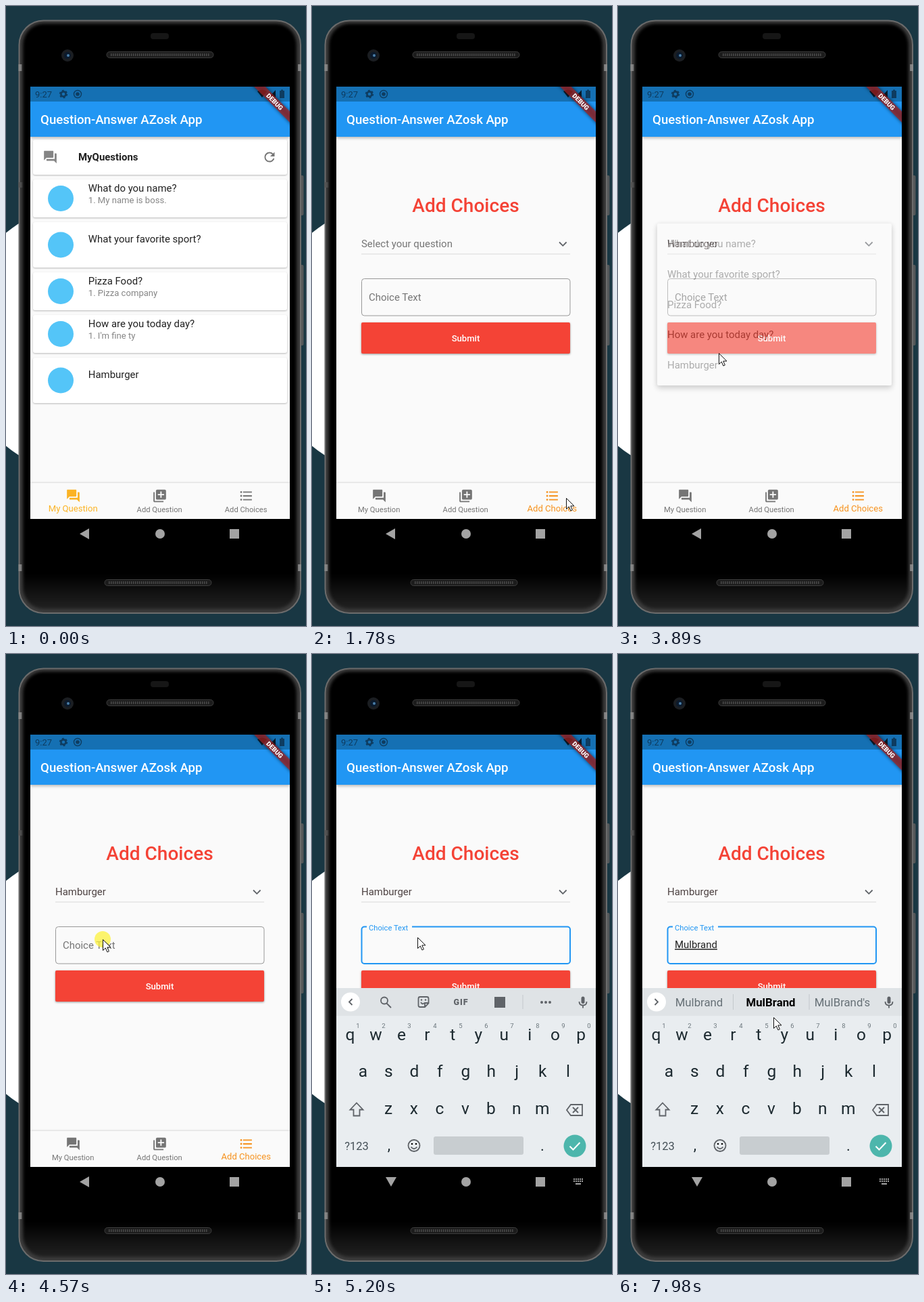
Recreate the animation shown at these times as an HTML page. Size 444 px wide and 915 px high, loop 8000 ms.

```html
<!DOCTYPE html>
<html lang="en">
<head>
<meta charset="utf-8">
<title>Question app demo</title>
<style>
  html, body { margin: 0; width: 100%; height: 100%; overflow: hidden; background: #193743; }
  svg { display: block; font-family: Roboto, sans-serif; }
  .line { fill: none; stroke: #5f6368; stroke-width: 1.8; }
  .card { fill: #fff; filter: drop-shadow(0 1px 1px #0004); }
  .bold { font-weight: 700; }
  .medium { font-weight: 500; }
  .mid { text-anchor: middle; }
</style>
</head>
<body>
<svg id="stage" width="444" height="915" viewBox="0 0 444 915"></svg>
<script>
const LOOP = 8000;
const BRAND = 'Mulbrand', BRAND_CAPS = 'MulBrand';
const QUESTIONS = ['What do you name?', 'What your favorite sport?', 'Pizza Food?', 'How are you today day?', 'Hamburger'];
const ANSWERS = ['1. My name is boss.', '', '1. Pizza company', "1. I'm fine ty", ''];
const GREY = [117, 117, 117], AMBER = [251, 179, 36], ORANGE = [246, 146, 30];

const FORUM = 'M21 6h-2v9H6v2c0 .55.45 1 1 1h11l4 4V7c0-.55-.45-1-1-1zm-4 6V3c0-.55-.45-1-1-1H3c-.55 0-1 .45-1 1v14l4-4h10c.55 0 1-.45 1-1z';
const ADD = 'M4 6H2v14c0 1.1.9 2 2 2h14v-2H4V6zm16-4H8c-1.1 0-2 .9-2 2v12c0 1.1.9 2 2 2h12c1.1 0 2-.9 2-2V4c0-1.1-.9-2-2-2zm-1 9h-4v4h-2v-4H9V9h4V5h2v4h4v2z';
const LIST = 'M7 5h14v2H7zM7 11h14v2H7zM7 17h14v2H7z' + [6, 12, 18].map(y => `M2.5 ${y}a1.5 1.5 0 1 0 3 0a1.5 1.5 0 1 0-3 0z`).join('');
const REFRESH = 'M17.65 6.35C16.2 4.9 14.21 4 12 4c-4.42 0-7.99 3.58-7.99 8s3.57 8 7.99 8c3.73 0 6.84-2.55 7.73-6h-2.08c-.82 2.33-3.04 4-5.65 4-3.31 0-6-2.69-6-6s2.69-6 6-6c1.66 0 3.14.69 4.22 1.78L13 11h7V4l-2.35 2.35z';

// Markup helpers
const text = (x, y, size, str, attrs = '') => `<text x="${x}" y="${y}" font-size="${size}" ${attrs}>${str}</text>`;
const rect = (x, y, w, h, attrs = '') => `<rect x="${x}" y="${y}" width="${w}" height="${h}" ${attrs}/>`;
const circle = (x, y, r, attrs = '') => `<circle cx="${x}" cy="${y}" r="${r}" ${attrs}/>`;
const path = (d, attrs = 'class="line"') => `<path d="${d}" ${attrs}/>`;
const icon = (d, x, y, attrs = '') => path(d, `transform="translate(${x - 11.2} ${y - 11.2}) scale(.934)" ${attrs}`);

function phone() {
  const speaker = (x, y) => rect(x, y, 158, 9, 'rx="4.5" fill="#1c1c1c" stroke="#3d3d3d"') +
    path(`M${x + 6} ${y + 4.5}h146`, 'stroke="#4a4a4a" stroke-width="4" stroke-dasharray="1.5 1.5"');
  return circle(130, 492, 204, 'fill="#fff"') +
    rect(434, 250, 6.5, 59, 'rx="2" fill="#55585a"') + rect(434, 382, 6.5, 119, 'rx="2" fill="#55585a"') +
    rect(19.5, 21.5, 416.5, 874.5, 'rx="36" fill="#3c3c3c" stroke="#6c6c6c" stroke-width="2"') +
    [86, 824].map(y => rect(18.5, y, 5, 10, 'fill="#888"') + rect(432, y, 5, 10, 'fill="#888"')).join('') +
    rect(18.5, 260, 6, 8, 'fill="#555"') +
    rect(25, 26, 405, 864, 'rx="31" fill="url(#face)" style="filter:blur(2px)"') +
    rect(214, 40, 27, 9, 'rx="4" fill="#161616"') +
    circle(91, 73, 9, 'fill="#1b1e22"') + circle(91, 73, 5, 'fill="#0b1a2c"') + circle(92, 73, 2, 'fill="#4a7ea8"') +
    speaker(149, 67.5) + speaker(146, 846.5);
}

function questionsPage() {
  const tops = [256, 319, 393, 456, 519];
  return rect(40, 197, 376, 52, 'rx="3" class="card"') + icon(FORUM, 65.5, 223, 'fill="#858585"') +
    text(107, 228, 14.95, 'MyQuestions', 'class="bold" fill="#212121"') + icon(REFRESH, 390, 223, 'fill="#757575"') +
    QUESTIONS.map((q, i) => {
      const y = tops[i], answer = ANSWERS[i], h = answer ? 56 : 67;
      return rect(40, y, 376, h, 'rx="3" class="card"') + circle(81, y + h / 2, 19, 'fill="#54c5f8"') +
        text(121.8, y + (answer ? 18 : 30), 14.95, q, 'fill="#212121"') + text(121.8, y + 34.5, 13.08, answer, 'fill="#858585"');
    }).join('');
}

function choicesPage() {
  return text(227.5, 303.5, 28, 'Add Choices', 'class="medium mid" fill="#f44336"') +
    text(73, 356, 14.95, '', 'id="selected"') +
    path('M366 348.5l5.3 5.3 5.3-5.3') + path('M73 366h309', 'stroke="#d8d8d8"') +
    rect(73.5, 402.5, 308.5, 54.5, 'id="field" rx="4" fill="none"') +
    rect(81, 400, 67, 5, 'id="gap" fill="#fafafa"') + text(84, 435, 14.95, 'Choice Text', 'id="label"') +
    text(84, 434, 14.95, '', 'id="typed" fill="#212121" text-decoration="underline"') +
    rect(0, 420, 1.8, 18, 'id="caret" fill="#2196f3"') +
    rect(73, 467, 309, 46, 'rx="2" fill="#f44336" style="filter:drop-shadow(0 1px 1.5px #0006)"') +
    text(227.5, 495, 13.1, 'Submit', 'class="medium mid" fill="#fff"');
}

function appChrome() {
  const ink = 'fill="#0e3c60"';
  return rect(36, 119, 384, 74, 'fill="#2196f3" style="filter:drop-shadow(0 2px 2px #0004)"') +
    rect(36, 119, 384, 22, 'fill="#1570b3"') +
    text(43, 134.7, 13, '9:27', ink) +
    circle(85, 130, 3.6, 'fill="none" stroke="#0e3c60" stroke-width="2.6"') +
    circle(85, 130, 5.4, 'fill="none" stroke="#0e3c60" stroke-width="1.6" stroke-dasharray="2.83"') +
    circle(106, 130, 5.5, 'fill="none" stroke="#0e3c60" stroke-width="1.4"') + circle(106, 130, 2.8, ink) +
    path('M372 126q7-5 14 0l-7 9zM399 124v11h-10z', 'fill="#0a1c2c"') + path('M405 125h2v-1.5h3v1.5h2v11h-7z', ink) +
    text(51, 174, 18.7, 'Question-Answer AZosk App', 'class="medium" fill="#fff"') +
    '<g transform="translate(397.7 141.3) rotate(45)">' +
    rect(-60, -6, 120, 12, 'opacity=".55" style="filter:blur(2.5px)"') +
    rect(-60, -5.8, 120, 11.6, 'fill="#a82222" opacity=".7"') +
    text(0, 3.4, 9.5, 'DEBUG', 'class="mid" font-weight="900" fill="#fff"') + '</g>';
}

function tabBar() {
  const tabs = [['My Question', FORUM], ['Add Question', ADD], ['Add Choices', LIST]];
  return rect(36, 704, 384, 53, 'fill="#fafafa" style="filter:drop-shadow(0 -1px 1px #0002)"') +
    `<g clip-path="url(#tabClip)">${circle(355, 729, 0, 'id="ripple" fill="#f6921e"')}</g>` +
    tabs.map(([name, d], i) => `<g id="tab${i}">${icon(d, 99.5 + 128 * i, 723)}${text(99.2 + 128 * i, 746.7, 11.2, name, 'class="mid"')}</g>`).join('');
}

function menu() {
  return '<g id="menu">' +
    rect(58, 321, 347, 239, 'id="sheet" rx="2" fill="#fafafa" style="filter:drop-shadow(0 4px 4px #0005) drop-shadow(0 1px 3px #0004)"') +
    QUESTIONS.map((q, i) => text(73, 356 + 44.8 * i, 14.95, q, `id="item${i}" fill="#2b2b2b"`)).join('') + '</g>';
}

function keyboard() {
  const row = (keys, x, y) => [...keys].map((k, i) => text(x + 37.95 * i, y, 24.5, k, 'class="mid"')).join('');
  const tools = circle(107, 511.5, 5, 'class="line"') + path('M110.5 515.5l6.5 6.5') +
    path('M160 506h10q2.5 0 2.5 2.5v7l-5.5 5.5h-7q-2.5 0-2.5-2.5v-10q0-2.5 2.5-2.5zM172 515h-5v5M161 514q2.5 4 5 1') +
    circle(162, 510.5, 1.2) + circle(168, 510.5, 1.2) +
    text(220.5, 518, 12.5, 'GIF', 'class="mid" font-weight="900" letter-spacing="1"') +
    rect(270, 506, 16, 16) + rect(311.5, 503, 1, 21, 'fill="#c3c8cb"') +
    [340, 346, 352].map(x => circle(x, 514, 2)).join('');
  const hints = ['left', 'middle', 'right'].map((id, i) =>
    text(120 + 106 * i, 520, 16.8, '', `id="${id}" class="mid${i === 1 ? ' bold' : ''}" ${i === 1 ? 'fill="#000"' : ''}`)).join('') +
    rect(170, 502, 1, 23, 'fill="#c3c8cb"') + rect(282.5, 502, 1, 23, 'fill="#c3c8cb"');
  return '<g id="keyboard">' + rect(36, 493, 384, 264, 'fill="#e9edf0"') + rect(36, 493, 384, 41, 'fill="#dfe3e6"') +
    circle(57, 513.5, 14, 'fill="#fff"') + path('M59.5 509l-4.5 4.5 4.5 4.5', 'id="arrow" class="line"') +
    `<g id="tools" fill="#5f6368">${tools}</g><g id="hints" fill="#667076">${hints}</g>` +
    rect(398.5, 505.5, 5, 10.5, 'rx="2.5" fill="#5f6368"') + path('M395.5 513q0 5.5 5.5 5.5t5.5-5.5M401 518.5v4') +
    '<g fill="#1d2a30">' + row('qwertyuiop', 56.5, 569.5) + row('asdfghjkl', 75.5, 624) + row('zxcvbnm', 113, 679) +
    text(66, 732, 16.5, '?123', 'class="mid" fill="#455057"') + text(114, 732, 22, ',', 'class="mid"') + text(341, 733, 22, '.', 'class="mid"') + '</g>' +
    [...'1234567890'].map((n, i) => text(68 + 38 * i, 551.5, 9.5, n, 'class="mid" fill="#6c777d"')).join('') +
    path('M66 662.5l9.5 10h-5v9h-9v-9h-5z') + path('M383 665h17v16h-17l-6-8zM386 669l8 8m0-8l-8 8') +
    circle(151, 725.5, 8.5, 'class="line"') + circle(148, 723, 1.3) + circle(154, 723, 1.3) + path('M146.5 727.5q4.5 5.5 9 0') +
    rect(180, 712, 133, 27, 'rx="3" fill="#c8cdd0"') + circle(389, 726, 16.5, 'fill="#4db6ac"') +
    path('M381.5 726.5l5 5 10-10.5', 'fill="none" stroke="#fff" stroke-width="2"') + '</g>';
}

function navBar() {
  return '<g fill="#a3a3a3">' + path('M109 779l14-8v16z', 'id="back"') + path('M109 772h16l-8 14z', 'id="hide"') +
    circle(228, 779, 7) + rect(331, 772, 14, 14) +
    `<g id="switcher">${[775, 778].map(y => path(`M387 ${y}h14`, 'stroke="#a3a3a3" stroke-width="2" stroke-dasharray="2 1"')).join('')}${rect(390, 781, 8, 2)}</g></g>`;
}

const $ = id => document.getElementById(id);
$('stage').innerHTML =
  `<defs><clipPath id="screen">${rect(36, 119, 384, 638)}</clipPath><clipPath id="tabClip">${rect(292, 704, 128, 53)}</clipPath>` +
  '<linearGradient id="face" x2="0" y2="1"><stop offset=".94"/><stop offset="1" stop-color="#222"/></linearGradient></defs>' +
  phone() + `<g clip-path="url(#screen)">${rect(36, 119, 384, 638, 'fill="#fafafa"')}` +
  `<g id="questions">${questionsPage()}</g><g id="choices">${choicesPage()}</g>` +
  appChrome() + tabBar() + menu() + keyboard() + '</g>' + navBar() +
  circle(0, 0, 12, 'id="press" fill="#fcf23c" opacity=".75"') +
  path('M.5 .5v16l3.8-3.6 2.6 6 2.5-1.1-2.6-5.9h5.2z', 'id="pointer" fill="#fff" stroke="#111"');

// Pointer stops: time, x, y
const STOPS = [[460, 342, 915], [860, 404, 642], [1230, 380, 715], [1300, 376, 726], [1980, 376, 726], [2500, 215, 355],
  [2800, 215, 355], [3550, 150, 528], [3760, 150, 528], [4300, 143, 421], [4640, 143, 421], [4900, 156, 418],
  [7570, 156, 418], [7980, 230, 536]];
const PRESSES = [[1270, 1400], [2520, 2640], [3620, 3730], [4450, 4640]];
// Typing: time, middle hint, right hint; each entry adds one letter
const TYPING = [[5730, 'My', 'Me'], [6190, 'Much', 'Must'], [6520, 'MUL', BRAND_CAPS + "'s"],
  ...[6660, 6850, 6980, 7110].map(at => [at, BRAND_CAPS + "'s", BRAND_CAPS]), [7250, BRAND_CAPS, BRAND_CAPS + "'s"]];

const lerp = (a, b, p) => a + (b - a) * p;
const mix = (a, b, p) => `rgb(${a.map((v, i) => Math.round(lerp(v, b[i], p)))})`;
const show = (id, on) => $(id).style.display = on ? '' : 'none';
const set = (id, attrs) => { for (const k in attrs) $(id).setAttribute(k, attrs[k]); };

function draw(t) {
  const ramp = (a, b) => Math.min(1, Math.max(0, (t - a) / (b - a)));
  const ease = (a, b) => { const p = ramp(a, b); return p * p * (3 - 2 * p); };

  // Tabs and pages
  const swap = ease(1430, 1640);
  show('questions', t < 1430);
  show('choices', t >= 1430);
  [1 - swap, 0, swap].forEach((p, i) => {
    set('tab' + i, { fill: mix(GREY, i ? ORANGE : AMBER, p) });
    const label = $('tab' + i).lastChild;
    label.setAttribute('font-size', lerp(11.2, 13.08, p));
    label.setAttribute('y', lerp(746.7, 746.2, p));
  });
  set('ripple', { r: 64 * ease(1360, 1700), opacity: .12 * (1 - ramp(1560, 1780)) });

  // Dropdown
  const open = ease(2690, 2795);
  show('menu', t > 2650 && t < 3980);
  set('menu', { opacity: ramp(2650, 2720) * (1 - ramp(3740, 3980)) });
  set('sheet', { y: lerp(328, 321, open), height: lerp(45, 239, open) });
  QUESTIONS.forEach((_, i) => set('item' + i, { opacity: i ? ramp(2780 + 25 * i, 2850 + 25 * i) : 1 }));
  $('selected').textContent = t < 3740 ? 'Select your question' : 'Hamburger';
  set('selected', { fill: t < 3740 ? '#757575' : '#4d4242' });

  // Text field
  const focus = ease(4650, 4830), focused = t >= 4650;
  set('field', { stroke: focused ? '#2196f3' : '#999', 'stroke-width': focused ? 2 : 1 });
  set('label', { y: lerp(435, 408.3, focus), 'font-size': lerp(14.95, 11.2, focus), fill: focused ? '#2196f3' : '#757575' });
  show('gap', focus > .6);
  const count = TYPING.filter(([at]) => t >= at).length;
  const word = BRAND.slice(0, count);
  $('typed').textContent = word;
  show('caret', count && t < 7700);
  set('caret', { x: 84.5 + $('typed').getComputedTextLength() });

  // Keyboard
  const up = t >= 4800;
  set('keyboard', { transform: `translate(0 ${264 * (1 - ease(4800, 5080))})` });
  show('keyboard', up);
  show('hide', up);
  show('switcher', up);
  show('back', !up);
  show('tools', !count);
  show('hints', count);
  set('arrow', { transform: count ? 'rotate(180 57 513.5)' : '' });
  if (count) {
    const [, middle, right] = TYPING[count - 1];
    $('left').textContent = word;
    $('middle').textContent = middle;
    $('right').textContent = right;
  }

  // Pointer
  const next = STOPS.findIndex(([at]) => at > t);
  const [t1, x1, y1] = STOPS.at(next), [t0, x0, y0] = STOPS.at(next < 0 ? -1 : Math.max(0, next - 1));
  const p = t1 > t0 ? ease(t0, t1) : 1;
  const transform = `translate(${lerp(x0, x1, p)} ${lerp(y0, y1, p)})`;
  set('pointer', { transform });
  set('press', { transform });
  show('pointer', t >= 460);
  show('press', PRESSES.some(([a, b]) => t >= a && t < b));
}

function frame() {
  draw(performance.now() % LOOP);
  requestAnimationFrame(frame);
}
frame();
</script>
</body>
</html>
```
